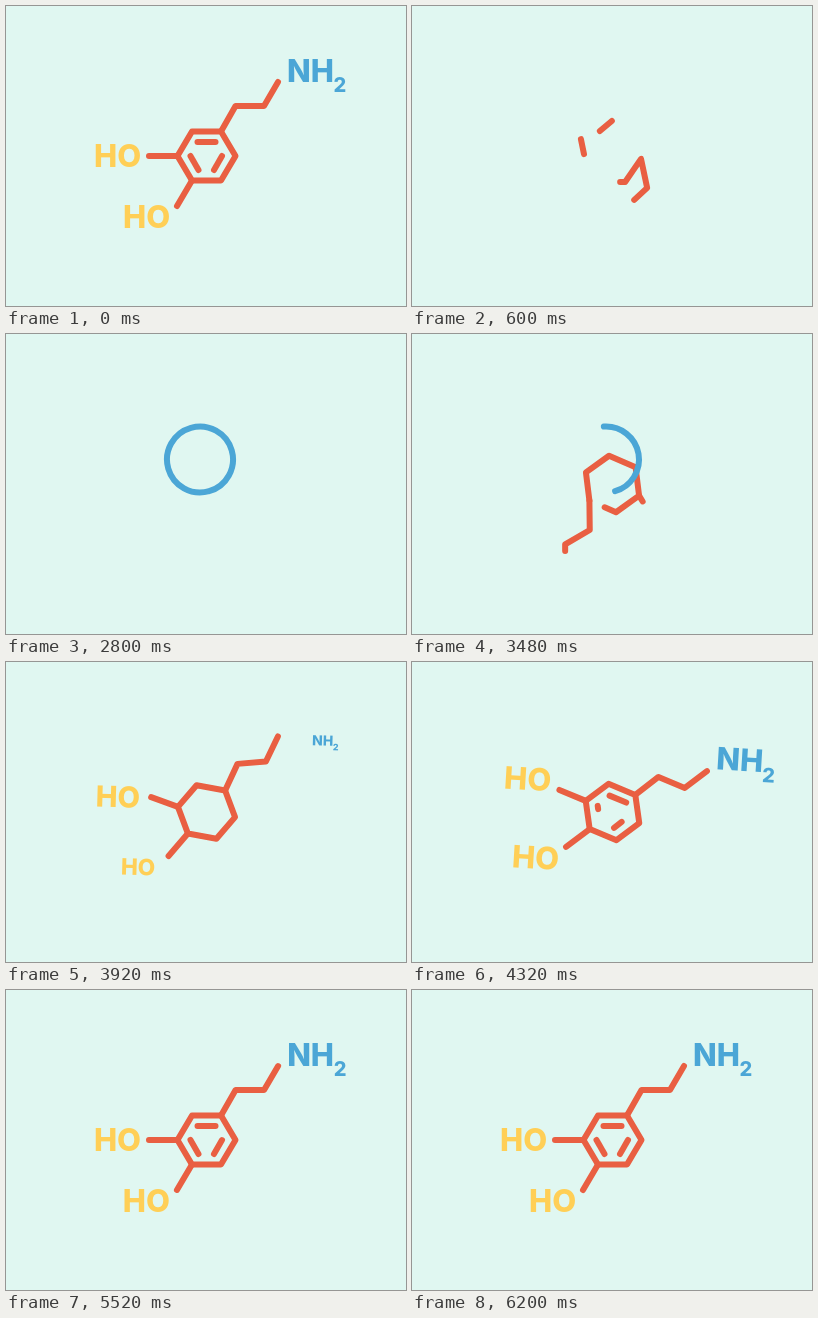
Recreate the animation shown at these times as an HTML page. Size 400x300 px, loop 6240 ms.

```html
<!DOCTYPE html>
<html lang="en">
<head>
<meta charset="utf-8">
<title>Molecule and heart</title>
<style>
  html, body { margin: 0; width: 100%; height: 100%; overflow: hidden; background: #e0f7f1; }
  svg { display: block; width: 100vw; height: 100vh; }
  path { fill: none; stroke: #e95f42; stroke-width: 6; stroke-linecap: round; stroke-linejoin: round; }
  #halo { stroke: #4ba6d6; }
  text { font: 800 31px Inter, "Open Sans", sans-serif; text-anchor: middle; fill: #ffcf56; }
  #amine text { fill: #4ba6d6; }
  #amine .sub { font-size: 20px; }
</style>
</head>
<body>
<svg viewBox="0 0 400 300">
  <path id="heart" d="M201 122C196 115 189 112 181 112C168 112 158 122 158 135C158 155 178 171 201 188C224 171 244 155 244 135C244 122 234 112 221 112C213 112 206 115 201 122"/>
  <g id="shards">
    <path d="M169 133L172 148"/>
    <path d="M188 125L200 115"/>
    <path d="M222 194L235 182L229 153L213 176L208 176"/>
  </g>
  <g id="molecule">
    <path id="ring" d="M14.5-24.5L29 0L14.5 24.5L-14.5 24.5L-29 0L-14.5-24.5L14.5-24.5"/>
    <path id="chain" d="M14.5-24.5L29-50L57.5-50L71.5-74"/>
    <path id="bondLeft" d="M-29 0L-57.5 0"/>
    <path id="bondLow" d="M-14.5 24.5L-29.5 50"/>
    <path id="dashTop" d="M9-14L-9-14"/>
    <path id="dashRight" d="M7.5 14L15.5 0"/>
    <path id="dashLeft" d="M-16 0L-8 14"/>
  </g>
  <path id="halo" d="M171.2 150.3A33.5 33.5 0 1 1 203 157.5A33.5 33.5 0 0 1 171.2 150.3"/>
  <g id="hydroxylLeft"><text y="11">HO</text></g>
  <g id="hydroxylLow"><text y="11">HO</text></g>
  <g id="amine"><text y="11">NH</text><text class="sub" x="29.5" y="21">2</text></g>
</svg>
<script>
const LOOP = 6240, CX = 200.5, CY = 150;
const SETTLE = 4089, REST = 5576, SWING = 24;
const $ = id => document.getElementById(id);
const shards = [...$('shards').children];

// rest: centre of the label; pivot: the point that follows the spin
const labels = [
  { el: $('hydroxylLeft'), rest: [-89, 0], pivot: [-85, 6], at: 0 },
  { el: $('hydroxylLow'), rest: [-60, 61], pivot: [-30, 50], at: 50 },
  { el: $('amine'), rest: [104, -85], pivot: [70, -75], at: 100 }
];

document.querySelectorAll('path').forEach(p => p.setAttribute('pathLength', 1));

const ramp = (t, a, b) => Math.min(1, Math.max(0, (t - a) / (b - a)));
const smooth = (t, a, b) => { const u = ramp(t, a, b); return u * u * (3 - 2 * u); };

function trim(el, from, to) {
  const shown = to - from > 0.001;
  el.style.display = shown ? '' : 'none';
  if (!shown) return;
  el.style.strokeDasharray = `${to - from} 2`;
  el.style.strokeDashoffset = -from;
}

function spinAt(t) {
  if (t < 2000) return -70 * ramp(t, 120, 600) ** 2;
  if (t < SETTLE) return SWING - 181 * ((SETTLE - t) / 609) ** 2;
  return SWING * (1 + Math.cos(Math.PI * ramp(t, SETTLE, REST))) / 2;
}

function bend(id, x, y, angle) {
  $(id).setAttribute('transform', `rotate(${angle} ${x} ${y})`);
}

function drawMolecule(t) {
  const spin = spinAt(t), leaving = t < 2000;
  const lag = leaving ? -0.5 * smooth(t, 200, 500) : Math.max(0, (SETTLE - t) / 609);
  const grow = (id, outA, outB, inA, inB) =>
    trim($(id), 0, leaving ? 1 - smooth(t, outA, outB) : ramp(t, inA, inB));

  $('molecule').setAttribute('transform', `translate(${CX} ${CY}) rotate(${spin})`);
  bend('chain', 14.5, -24.5, -54 * lag);
  bend('bondLeft', -29, 0, 35 * lag);
  if (leaving) trim($('ring'), smooth(t, 300, 560), 1);
  else trim($('ring'), 0, ramp(t, 3220, 3509));
  grow('chain', 200, 480, 3270, 3550);
  grow('bondLeft', 180, 400, 3440, 3610);
  grow('bondLow', 220, 440, 3490, 3660);
  grow('dashTop', 160, 360, 4060, 4320);
  grow('dashRight', 200, 400, 4160, 4430);
  grow('dashLeft', 240, 440, 4270, 4520);

  const a = spin * Math.PI / 180, c = Math.cos(a) - 1, s = Math.sin(a);
  for (const { el, rest, pivot: [px, py], at } of labels) {
    const size = leaving ? 1 - smooth(t, 120 + at, 320 + at) : smooth(t, 3700 + at, 3960 + at);
    const x = CX + rest[0] + c * px - s * py;
    const y = CY + rest[1] + s * px + c * py;
    const tilt = leaving ? 0 : spin * 0.15;
    el.style.display = size > 0.01 ? '' : 'none';
    el.setAttribute('transform', `translate(${x} ${y}) rotate(${tilt}) scale(${size})`);
  }
}

function render(t) {
  drawMolecule(t);
  shards.forEach(p => trim(p, smooth(t, 610, 760), smooth(t, 480, 600)));
  $('shards').setAttribute('transform', `rotate(${(600 - t) * 0.3} ${CX} ${CY})`);
  trim($('heart'), smooth(t, 2040, 2360), smooth(t, 640, 1040));
  // the halo unwinds clockwise towards its lower end
  const sweep = ramp(t, 3230, 3700);
  const start = 0.17 + 0.83 * sweep;
  const whole = t < 3230;
  $('halo').setAttribute('d', arc(whole ? -286 : -286 + 360 * (start - 0.17) / 0.83));
  trim($('halo'), 0, t < 3700 ? smooth(t, 2360, 2640) : 0);
}

function arc(from) {
  const at = deg => {
    const a = deg * Math.PI / 180;
    return `${194 + 33 * Math.cos(a)} ${125.5 + 33 * Math.sin(a)}`;
  };
  const mid = (from + 74) / 2;
  return `M${at(from)}A33 33 0 0 1 ${at(mid)}A33 33 0 0 1 ${at(74)}`;
}

const begin = performance.now();
function tick(now) {
  render(Math.max(0, now - begin) % LOOP);
  requestAnimationFrame(tick);
}
render(0);
requestAnimationFrame(tick);
</script>
</body>
</html>
```
